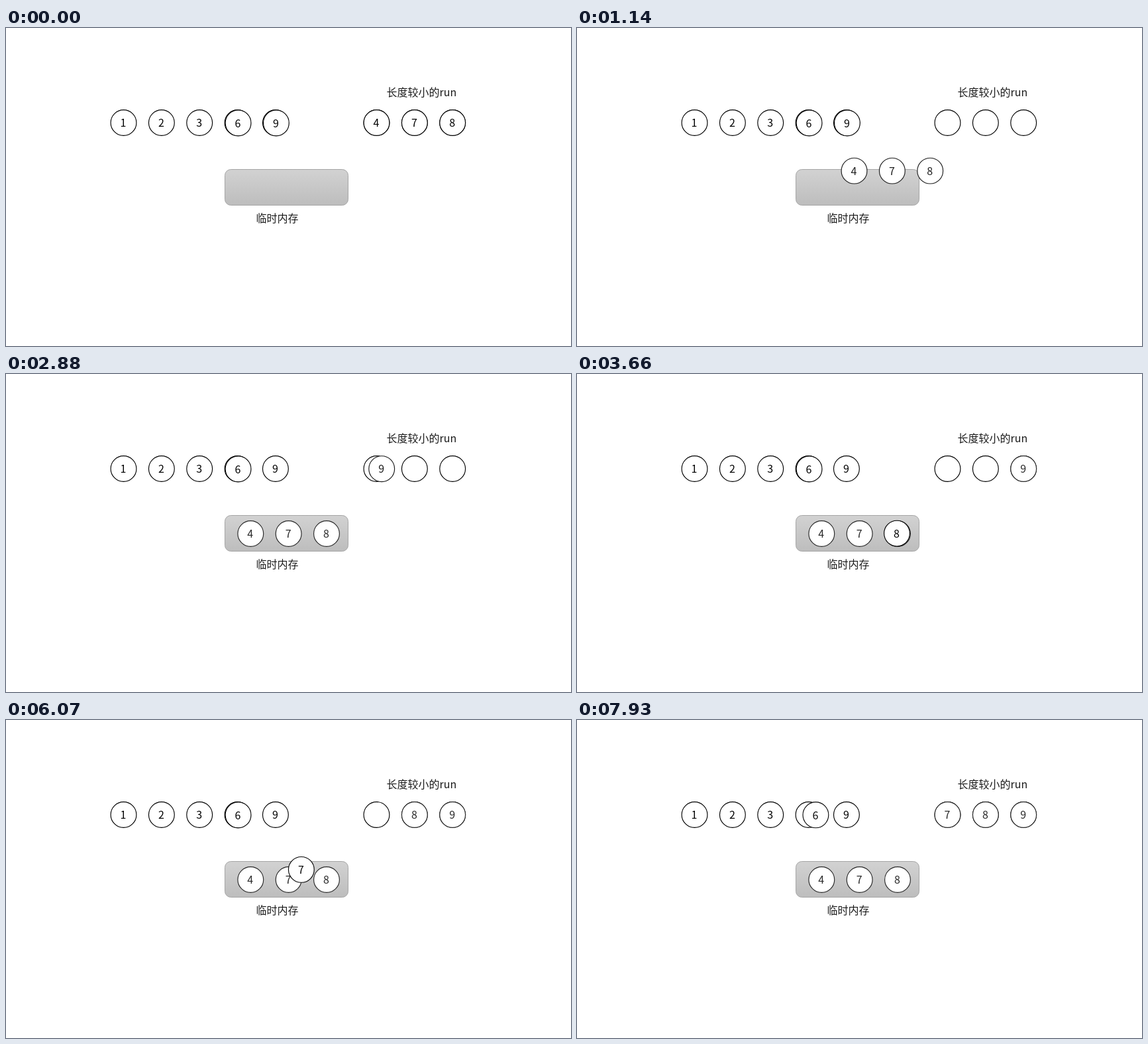
Recreate the animation shown at these times as an HTML page. Size 853 by 480 pixels, loop 7.99 s.

```html
<!DOCTYPE html>
<html lang="zh-CN">
<head>
<meta charset="utf-8">
<style>
  html, body { margin: 0; width: 100%; height: 100%; overflow: hidden; background: #fff; }
  svg { display: block; width: 853px; height: 480px; }
  text { font: 350 16px "Noto Sans CJK SC", "Noto Sans CJK", "Noto Sans", sans-serif; fill: #1c1c1c; }
  circle { fill: #fff; stroke: currentColor; stroke-width: 1.15; }
  .ball text { text-anchor: middle; fill: currentColor; }
</style>
</head>
<body>
<svg id="stage" viewBox="0 0 853 480">
  <defs>
    <linearGradient id="grey" x2="0" y2="1">
      <stop offset="0" stop-color="#d2d2d2"/>
      <stop offset="1" stop-color="#bdbdbd"/>
    </linearGradient>
  </defs>
  <text x="574.5" y="103">长度较小的run</text>
  <rect x="330.5" y="213.5" width="186" height="54" rx="9" fill="url(#grey)" stroke="#a5a5a5"/>
  <text x="377.5" y="292.5">临时内存</text>
</svg>
<script>
const LOOP = 7990, MOVE = 1660;
const COPY_START = 78, MERGE_START = 1965, MERGE_STEP = 1825;
const stage = document.getElementById('stage');

// A row of equally spaced slots
const row = (x, y) => i => ({ x: x + 57.35 * i, y });
const leftSlot = row(177.5, 143), rightSlot = row(559.5, 143), memorySlot = row(369.3, 241);
const leftRun = [1, 2, 3, 6, 9], rightRun = [4, 7, 8];

function svg(tag, parent, attrs) {
  const node = document.createElementNS('http://www.w3.org/2000/svg', tag);
  for (const name in attrs) node.setAttribute(name, attrs[name]);
  return parent.appendChild(node);
}

function ball(label, { x, y }) {
  const group = svg('g', stage, { class: 'ball', transform: `translate(${x} ${y})` });
  svg('circle', group, { r: 19.4 });
  svg('text', group, { x: -0.5, y: 6.3 }).textContent = label;
  return group;
}

const moves = [];
function move(label, from, to, start, appear = 0) {
  moves.push({ node: ball(label, from), from, to, start, appear });
}

// Copies lie slightly off the circle they were taken from
const nudge = ({ x, y }, d) => ({ x: x + d, y: y + 0.4 * d });

leftRun.forEach((label, i) => ball(label, leftSlot(i)));
rightRun.forEach((_, i) => ball('', rightSlot(i)));
rightRun.forEach((label, i) => move(label, rightSlot(i), memorySlot(i), COPY_START));

// Merge from the back: the larger tail goes to the last free slot
const targets = [leftSlot(4), ...rightRun.map((_, i) => rightSlot(i))];
let left = leftRun.length - 1, right = rightRun.length - 1;
for (let start = MERGE_START; targets.length; start += MERGE_STEP) {
  const to = targets.pop();
  if (leftRun[left] > rightRun[right]) {
    move(leftRun[left], nudge(leftSlot(left), 1), to, start);
    left--;
  } else {
    move(rightRun[right], nudge(memorySlot(right), -1), to, start, start - MERGE_STEP + MOVE);
    right--;
  }
}

const ease = u => u < 0.5 ? 2 * u * u : 1 - 2 * (1 - u) ** 2;

function draw() {
  const t = performance.now() % LOOP;
  for (const { node, from, to, start, appear } of moves) {
    const p = ease(Math.min(1, Math.max(0, (t - start) / MOVE)));
    const x = from.x + (to.x - from.x) * p;
    const y = from.y + (to.y - from.y) * p;
    const shade = 40 * p;
    node.setAttribute('transform', `translate(${x} ${y})`);
    node.style.color = `rgb(${shade}, ${shade}, ${shade})`;
    node.style.display = t < appear ? 'none' : '';
  }
  requestAnimationFrame(draw);
}
draw();
</script>
</body>
</html>
```
